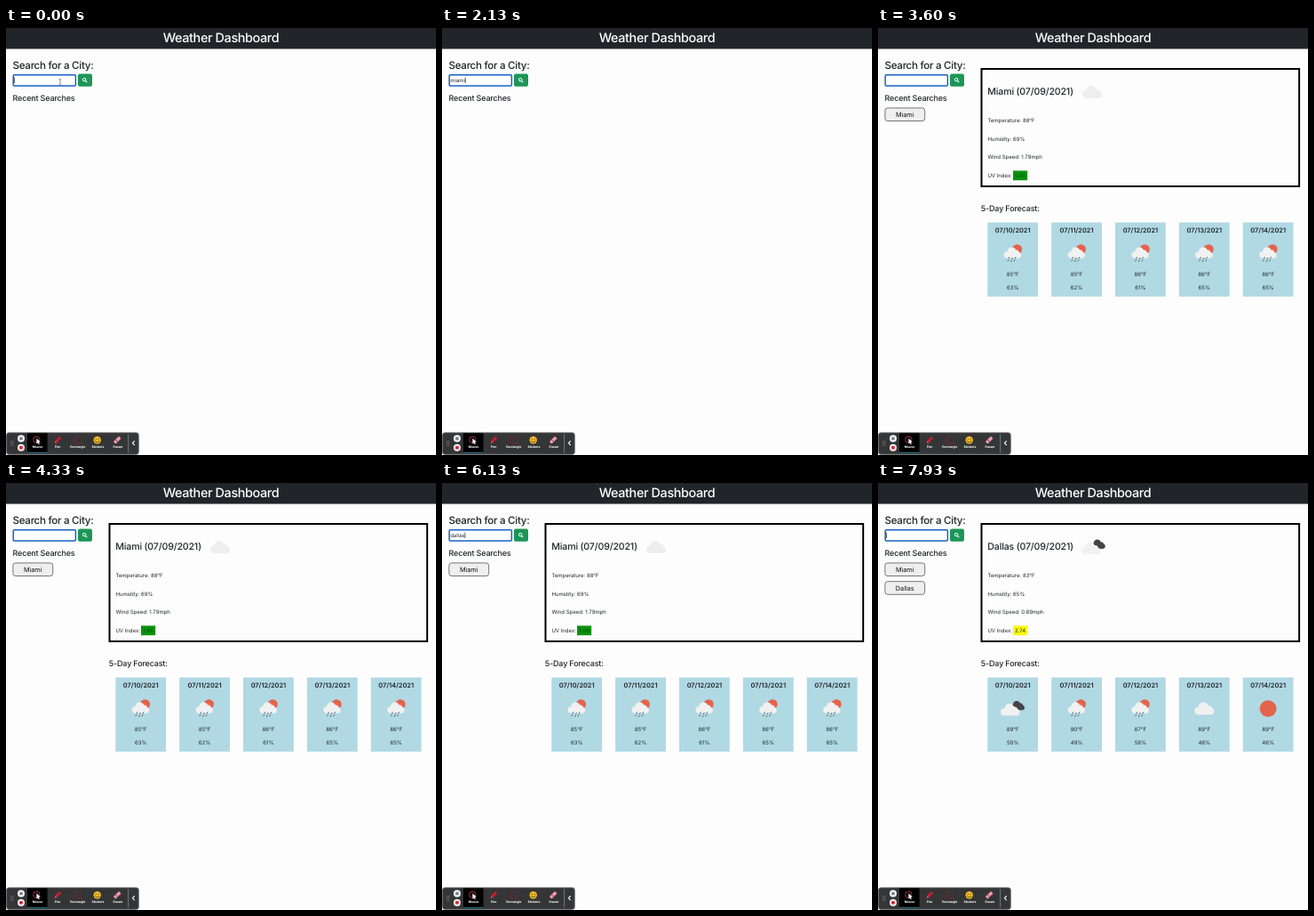
An HTML page with a canvas for the animation above (8 s loop, 484 by 480 pixels).

```html
<!DOCTYPE html>
<html lang="en">
<head>
<meta charset="utf-8">
<title>Weather Dashboard</title>
<style>
html, body { margin: 0; width: 100%; height: 100%; overflow: hidden; background: #fdfdfd; }
canvas { display: block; width: 484px; height: 480px; }
</style>
</head>
<body>
<canvas id="stage"></canvas>
<script>
const W = 484, H = 480, LOOP = 8000;
const canvas = document.getElementById('stage');
const ctx = canvas.getContext('2d');
const dpr = window.devicePixelRatio || 1;
canvas.width = W * dpr;
canvas.height = H * dpr;

const INK = '#212529', LIGHT = '#f1f1f1', SUN = '#e4634c';

// Each search: key times, moment of submit, moment the forecast arrives.
const searches = [
  {
    typed: 'miami', keys: [1130, 1290, 1530, 1700, 1860], submit: 2680, loaded: 3200,
    city: 'Miami', icon: 'cloud', temp: 88, humidity: 69, wind: '1.79',
    uv: '1.06', uvFill: '#0b930f', uvInk: '#07500a',
    days: [['rain', 85, 63], ['rain', 85, 62], ['rain', 86, 61], ['rain', 86, 65], ['rain', 86, 65]]
  },
  {
    typed: 'dallas', keys: [4600, 4800, 5000, 5260, 5460, 5730], submit: 6480, loaded: 6990,
    city: 'Dallas', icon: 'broken', temp: 83, humidity: 65, wind: '0.89',
    uv: '2.74', uvFill: '#fbfb10', uvInk: INK,
    days: [['broken', 89, 50], ['rain', 90, 49], ['rain', 87, 58], ['cloud', 89, 48], ['sun', 89, 46]]
  }
];

function text(str, x, y, size, { weight = 400, color = INK, align = 'left', track = 0 } = {}) {
  ctx.font = `${weight} ${size}px Inter, "Open Sans", sans-serif`;
  ctx.letterSpacing = `${track * size}px`;
  ctx.textRendering = 'geometricPrecision';
  ctx.textAlign = align;
  ctx.fillStyle = color;
  ctx.fillText(str, x, y);
}

function rect(x, y, w, h, color) {
  ctx.fillStyle = color;
  ctx.fillRect(x, y, w, h);
}

function box(x, y, w, h, r, fill, stroke, line = 1) {
  ctx.beginPath();
  ctx.roundRect(x, y, w, h, r);
  if (fill) { ctx.fillStyle = fill; ctx.fill(); }
  if (stroke) { ctx.strokeStyle = stroke; ctx.lineWidth = line; ctx.stroke(); }
}

function disc(x, y, r, color) {
  ctx.fillStyle = color;
  ctx.beginPath();
  ctx.arc(x, y, r, 0, Math.PI * 2);
  ctx.fill();
}

function ring(x, y, r, color, line) {
  ctx.strokeStyle = color;
  ctx.lineWidth = line;
  ctx.beginPath();
  ctx.arc(x, y, r, 0, Math.PI * 2);
  ctx.stroke();
}

function path(points, color, line) {
  ctx.beginPath();
  points.forEach(([x, y]) => ctx.lineTo(x, y));
  if (line) {
    ctx.strokeStyle = color;
    ctx.lineWidth = line;
    ctx.stroke();
  } else {
    ctx.fillStyle = color;
    ctx.fill();
  }
}

// Draws a cloud 22 units wide and 14 high from its top left corner.
function cloud(x, y, scale, color) {
  ctx.save();
  ctx.translate(x, y);
  ctx.scale(scale, scale);
  disc(10, 5.6, 5.6, color);
  disc(4.2, 9.8, 4.2, color);
  disc(15.6, 7.6, 4, color);
  disc(18.2, 10.2, 3.8, color);
  rect(4.2, 7, 14, 7, color);
  ctx.restore();
}

// Weather icons are placed by their centre.
const icons = {
  cloud(x, y, color) {
    cloud(x - 11, y - 7, 1, color);
  },
  broken(x, y) {
    cloud(x - 3, y - 8.5, 0.74, '#454545');
    cloud(x - 13.5, y - 5.5, 0.97, LIGHT);
  },
  rain(x, y) {
    disc(x + 4.8, y - 4.6, 5.6, SUN);
    cloud(x - 10, y - 7, 0.88, LIGHT);
    for (let i = 0; i < 6; i++) {
      const dx = x - 4.4 + (i % 3) * 3.6 - (i > 2 ? 1 : 0);
      const dy = y + (i > 2 ? 7.8 : 4.8) + (i % 3 === 1 ? 0.8 : 0);
      path([[dx + 0.6, dy - 0.7], [dx - 0.4, dy + 0.9]], '#4b4b4b', 1);
    }
  },
  sun(x, y) {
    disc(x, y + 0.3, 9.4, SUN);
  }
};

function header() {
  rect(0, 0, W, 23.5, INK);
  text('Weather Dashboard', 242, 16.4, 14.4,
    { weight: 500, color: '#fff', align: 'center', track: -0.026 });
}

function searchPanel(t) {
  text('Search for a City:', 7.5, 45.8, 11.6, { weight: 500, track: -0.025 });
  box(8.2, 52.7, 70.2, 12.4, 1, '#fff', '#1862c6', 1.5);
  box(81, 51.6, 16, 14.2, 2, '#1c9657');
  ring(88.2, 58.1, 1.75, '#fff', 1);
  path([[89.4, 59.3], [91.2, 61.1]], '#fff', 1.2);

  const value = inputValue(t);
  text(value, 9.2, 60.8, 6);
  if (caretOn(t)) {
    ctx.font = '400 6px Inter, "Open Sans", sans-serif';
    const x = 9.1 + ctx.measureText(value).width;
    rect(x, 55.6, 0.7, 6.4, '#222');
  }
  if (t < searches[0].keys[0]) iBeam(61, 60.5);

  text('Recent Searches', 7.5, 82, 9, { weight: 500, track: -0.02 });
  searches.filter(s => t >= s.submit).forEach((s, i) => {
    const y = 89.9 + i * 20.8;
    box(7.9, y, 44.8, 14.6, 3, '#efefef', '#555', 0.8);
    text(s.city, 30.2, y + 9.9, 7.3, { color: '#111', align: 'center' });
  });
}

function inputValue(t) {
  const s = searches.find(s => t >= s.keys[0] && t < s.submit);
  return s ? s.typed.slice(0, s.keys.filter(k => t >= k).length) : '';
}

// The blink restarts with every change of the field.
function caretOn(t) {
  const marks = searches.flatMap(s => [...s.keys, s.submit]);
  const last = marks.filter(m => t >= m).pop() ?? -200;
  return (t - last) % 1000 < 500;
}

function iBeam(x, y) {
  rect(x - 0.35, y - 3, 0.7, 6.4, '#555');
  rect(x - 1.4, y - 3.5, 2.8, 0.6, '#777');
  rect(x - 1.4, y + 3.2, 2.8, 0.6, '#777');
}

function weather(s) {
  box(116.5, 46, 357.6, 132, 0, null, '#000', 2);
  text(`${s.city} (07/09/2021)`, 123.3, 74.6, 10.6, { weight: 500, track: -0.015 });
  icons[s.icon](s.icon === 'cloud' ? 241 : 242.5, 72, '#eeeeee');
  text(`Temperature: ${s.temp}°F`, 123.4, 106.1, 6);
  text(`Humidity: ${s.humidity}%`, 123.4, 127, 6);
  text(`Wind Speed: ${s.wind}mph`, 123.4, 147.4, 6);
  text('UV Index:', 123.4, 168.2, 6);
  rect(152, 160.4, 16.2, 10.8, s.uvFill);
  text(s.uv, 160.1, 168.2, 6, { color: s.uvInk, align: 'center' });

  text('5-Day Forecast:', 115.8, 206.2, 9, { weight: 500, track: -0.02 });
  s.days.forEach(([icon, temp, humidity], i) => {
    const x = 123.3 + i * 71.85, mid = x + 28.4;
    rect(x, 218.6, 56.8, 83.3, '#b0d9e3');
    text(`07/${10 + i}/2021`, mid, 229.5, 7.4, { weight: 600, align: 'center' });
    icons[icon](mid, 253.4, LIGHT);
    text(`${temp}°F`, mid, 279, 6.1, { align: 'center' });
    text(`${humidity}%`, mid, 294.2, 6.1, { align: 'center' });
  });
}

function tilted(x, y, angle, draw) {
  ctx.save();
  ctx.translate(x, y);
  ctx.rotate(angle);
  draw();
  ctx.restore();
}

function toolbar() {
  box(0.7, 455, 148.5, 24.2, 2.5, '#343536', '#5a5b5c', 1);
  for (let i = 0; i < 8; i++) {
    rect(5.3 + (i % 2) * 2, 464 + (i >> 1) * 1.7, 0.9, 0.8, '#999');
  }
  disc(17, 461.5, 4, '#f4f4f4');
  rect(15.6, 459.8, 1, 3.4, '#333');
  rect(17.4, 459.8, 1, 3.4, '#333');
  disc(17, 471.7, 4, '#f4f4f4');
  box(15.2, 469.9, 3.6, 3.6, 0.5, '#dd2233');

  rect(24, 455.5, 22.6, 22.6, '#000');
  rect(24, 476.8, 22.6, 1, '#2e7f98');
  ring(34.3, 462.8, 3.6, '#c8364a', 0.9);
  path([[34.4, 461.3], [34.4, 467.5], [35.9, 466.2], [36.8, 468.2], [37.8, 467.7],
    [36.9, 465.8], [38.8, 465.6]], '#fff');

  tilted(58, 463.4, -Math.PI / 4, () => {
    box(-2.2, -1.5, 6.6, 3, 0.8, '#d3202f');
    path([[-2.4, -1.5], [-4.8, 0], [-2.4, 1.5]], '#e5485a');
    rect(0.8, -1.5, 0.6, 3, '#7c1620');
  });

  ctx.setLineDash([1.6, 0.8]);
  box(77.2, 459.6, 7.4, 7.4, 0, null, '#95202e', 0.9);
  ctx.setLineDash([]);

  disc(102.7, 463.2, 4.2, '#efbd27');
  disc(101.2, 462.1, 0.65, '#5a3b0c');
  disc(104.2, 462.1, 0.65, '#5a3b0c');
  ctx.beginPath();
  ctx.arc(102.7, 463.5, 2.3, 0.15, Math.PI - 0.15);
  ctx.strokeStyle = '#5a3b0c';
  ctx.lineWidth = 0.8;
  ctx.stroke();

  tilted(125.2, 463.2, -Math.PI / 4, () => {
    box(-4.4, -1.8, 8.8, 3.6, 0.8, '#ef9ba8');
    rect(-1.6, -1.8, 1.2, 3.6, '#b8566a');
  });

  ['Mouse', 'Pen', 'Rectangle', 'Stickers', 'Eraser'].forEach((name, i) => {
    text(name, 35.5 + i * 22.65, 472.4, 3.5, { weight: 700, color: '#fff', align: 'center' });
  });
  rect(137.3, 456.5, 0.8, 21, '#85888a');
  path([[144.7, 464.1], [142.5, 466.6], [144.7, 469.1]], '#fff', 1.1);
}

function draw(t) {
  ctx.setTransform(dpr, 0, 0, dpr, 0, 0);
  rect(0, 0, W, H, '#fdfdfd');
  header();
  searchPanel(t);
  const shown = searches.filter(s => t >= s.loaded).pop();
  if (shown) weather(shown);
  toolbar();
}

const start = performance.now();
function tick() {
  draw((performance.now() - start) % LOOP);
  requestAnimationFrame(tick);
}
tick();
</script>
</body>
</html>
```
